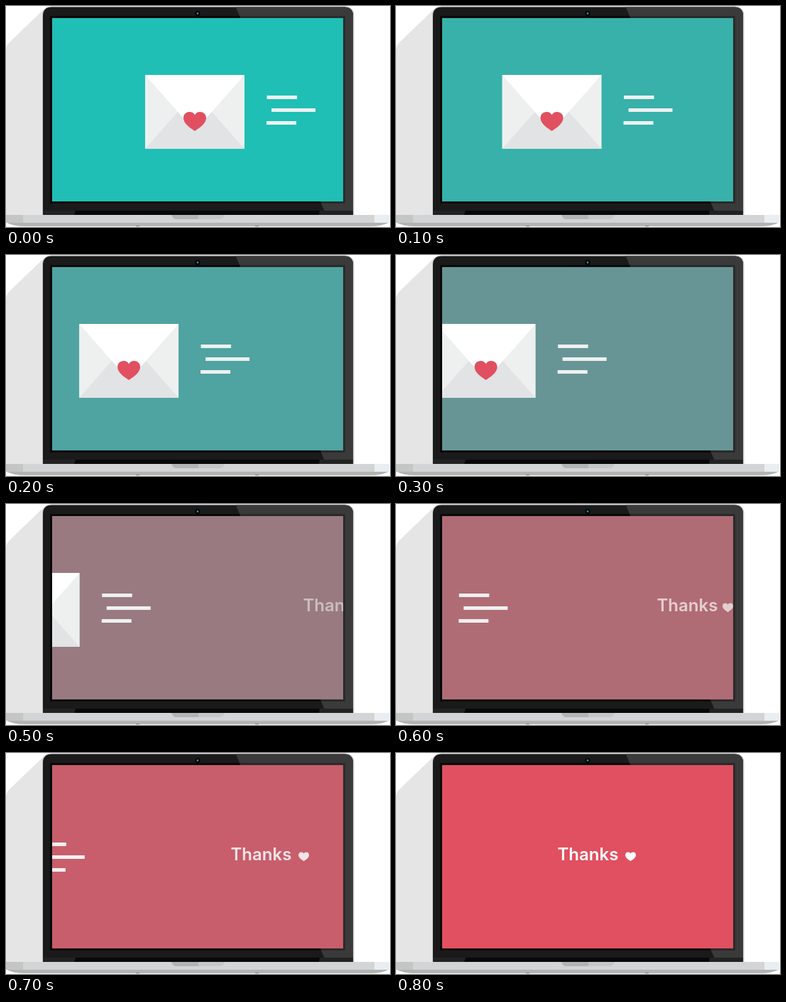
These frames come from a looping animation (541 by 311 pixels, 900 ms). An HTML page:

```html
<!DOCTYPE html>
<html lang="en">
<head>
<meta charset="utf-8">
<title>Thanks</title>
<style>
  html, body { margin: 0; width: 100%; height: 100%; overflow: hidden; background: #fff; }
  svg { display: block; width: 100%; height: 100%; }
  text { font: 600 24px Inter, "Open Sans", sans-serif; }
</style>
</head>
<body>
<svg viewBox="0 0 541 311" xmlns="http://www.w3.org/2000/svg">
  <defs>
    <clipPath id="view"><rect x="65" y="17" width="410" height="258"/></clipPath>
    <clipPath id="lid"><path d="M52 294V14Q52 1.5 64.500 1.500H476.500Q489 1.500 489 14V294Z"/></clipPath>
    <path id="heart" d="M16 27C12 24 0 17.500 0 8.500C0 3.500 4 0 8.500 0C12 0 14.500 1.600 16 4.200C17.500 1.600 20 0 23.500 0C28 0 32 3.500 32 8.500C32 17.500 20 24 16 27Z"/>
  </defs>

  <path fill="#e5e5e5" d="M0 294V63Q0 56 5 51L54 4V294Z"/>

  <!-- lid -->
  <path fill="#c9cacb" d="M51 294V14Q51 .5 64.500 .5H476.500Q490.500 .5 490.500 14V294Z"/>
  <g clip-path="url(#lid)">
    <rect x="51" width="440" height="294" fill="#1a1a1a"/>
    <path fill="#3a3a3a" d="M323 0H491V294H451Z"/>
    <rect x="62" y="14" width="416" height="264" fill="#090909"/>
    <path fill="#2a2a2a" d="M329 14H478V278H444Z"/>
    <rect x="51" y="288" width="440" height="6" fill="#222"/>
    <path fill="#080808" d="M98 288H442L441 294H96Z"/>
  </g>
  <circle cx="270" cy="10.500" r="3.500" fill="#050505"/>
  <circle cx="270" cy="10.500" r="1.400" fill="#3b86a0"/>

  <!-- screen -->
  <g clip-path="url(#view)">
    <rect id="screen" x="65" y="17" width="410" height="258"/>
    <g id="mail">
      <g transform="translate(196 97)">
        <path fill="#eef0f0" d="M0 0H140V104H0Z"/>
        <path fill="#e1e3e5" d="M0 104L46 52L70 30L94 52L140 104Z"/>
        <path fill="#fff" d="M0 0H140L70 79Z"/>
        <use href="#heart" x="54" y="52" fill="#e05061"/>
      </g>
      <path fill="#eef0f0" d="M367.500 126h42.500v5h-42.500ZM374 144h62v5h-62ZM367 162h42v5h-42Z"/>
    </g>
    <g id="thanks" fill="#fff">
      <text id="word" y="151">Thanks</text>
      <use id="love" href="#heart"/>
    </g>
  </g>

  <!-- base -->
  <path fill="#b2b3b3" d="M0 304.500H540Q529 310 514 310H26Q11 310 0 304.500Z"/>
  <rect y="294" width="540" height="11" fill="#d2d4d5"/>
  <rect y="294" width="24" height="11" fill="#c4c5c5"/>
  <rect x="519" y="294" width="21" height="11" fill="#e8eef2"/>
  <path fill="#b3b4b6" d="M233 294H271V300H240Q235 300 233 294Z"/>
  <path fill="#c4c6c7" d="M271 294H308Q306 300 301 300H271Z"/>
  <path fill="#858585" d="M183 309h5v1.300h-5ZM351 309h5v1.300h-5Z"/>
</svg>
<script>
  const STEP = 100, STEPS = 9;
  const teal = [31, 191, 181], red = [224, 80, 96];
  const el = id => document.getElementById(id);
  const mix = (a, b, p) => a + (b - a) * p;

  // Slides in evenly, then jumps to its resting place.
  const slide = (k, rest, entry, speed) => k === 8 ? rest : entry + (7 - k) * speed;

  function draw(ms) {
    const k = Math.floor(ms / STEP) % STEPS;
    const rgb = teal.map((c, i) => Math.round(mix(c, red[i], k / 8)));
    el('screen').setAttribute('fill', `rgb(${rgb})`);
    el('mail').setAttribute('transform', `translate(${-46.45 * k} 0)`);

    el('thanks').setAttribute('visibility', k < 5 ? 'hidden' : 'visible');
    el('thanks').setAttribute('opacity', Math.max(0, (k - 2) / 6));
    el('word').setAttribute('x', slide(k, 227.5, 316.5, 51));
    el('love').setAttribute('transform', `translate(${slide(k, 323, 412, 48)} 139.5) scale(.47)`);
  }

  function tick() {
    draw(performance.now());
    requestAnimationFrame(tick);
  }
  tick();
</script>
</body>
</html>
```
